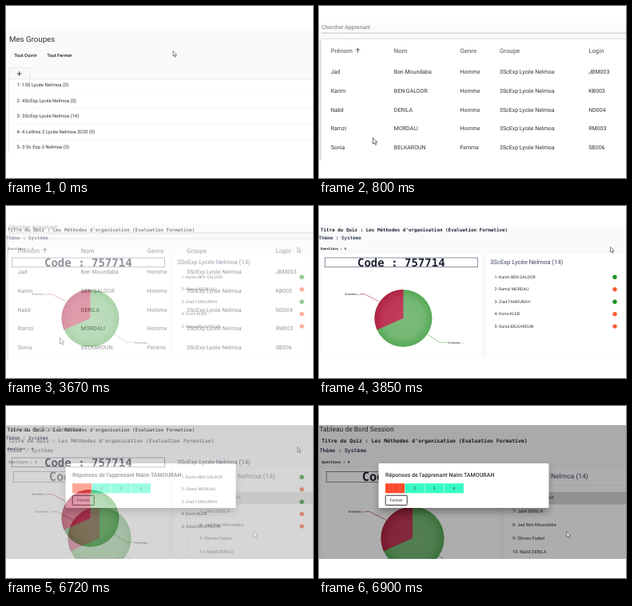
These frames come from a looping animation (384x216 px, 8 s). An HTML page:

```html
<!DOCTYPE html>
<html lang="fr">
<head>
<meta charset="utf-8">
<title>Quiz</title>
<style>
html, body { margin: 0; width: 100%; height: 100%; overflow: hidden; background: #fff; }
svg { display: block; width: 100vw; height: 100vh; font-family: Roboto, sans-serif; fill: #333; text-rendering: geometricPrecision; }
.mono { font-family: "DejaVu Sans Mono", monospace; font-weight: bold; fill: #1f2433; }
.med { font-weight: 500; }
.mid { text-anchor: middle; }
.head { font-size: 7.8px; font-weight: 500; fill: #757575; }
.page { fill: #fafafa; }
.white { fill: #fff; }
.line { fill: none; stroke-width: .6; }
.scene { opacity: 0; animation: 8s linear infinite; }
#learners { animation-name: in1; }
#quizPage { animation-name: in2; }
#board { animation-name: in3; }
/* six 60 ms steps, the first one immediate */
@keyframes in1 {
  0% { opacity: 0; }
  6.2375% { opacity: 0; animation-timing-function: steps(6, start); }
  10.7375%, 100% { opacity: 1; }
}
@keyframes in2 {
  0% { opacity: 0; }
  44.3625% { opacity: 0; animation-timing-function: steps(6, start); }
  48.8625%, 100% { opacity: 1; }
}
@keyframes in3 {
  0% { opacity: 0; }
  82.4875% { opacity: 0; animation-timing-function: steps(6, start); }
  86.9875%, 100% { opacity: 1; }
}
</style>
</head>
<body>
<svg viewBox="0 0 384 216" preserveAspectRatio="none">
  <defs>
    <radialGradient id="green" gradientUnits="userSpaceOnUse" cx="105.5" cy="141" r="36">
      <stop offset="0" stop-color="#7dbb7d"/><stop offset=".7" stop-color="#73b773"/><stop offset="1" stop-color="#56a856"/>
    </radialGradient>
    <radialGradient id="red" gradientUnits="userSpaceOnUse" cx="105.5" cy="141" r="36">
      <stop offset="0" stop-color="#c23f5c"/><stop offset=".7" stop-color="#bd3655"/><stop offset="1" stop-color="#b02244"/>
    </radialGradient>
    <filter id="soft" x="-20%" y="-20%" width="140%" height="160%"><feGaussianBlur stdDeviation="2"/></filter>
    <filter id="deep" x="-20%" y="-40%" width="140%" height="200%"><feGaussianBlur stdDeviation="5"/></filter>
    <clipPath id="listCut"><rect y="24" width="384" height="168"/></clipPath>
    <clipPath id="cardCut"><rect y="22" width="384" height="172"/></clipPath>
    <path id="cursor" d="M0 0V7.6L1.8 6.1 3 8.9 4.3 8.3 3.1 5.6H5.4Z" fill="#fff" stroke="#333" stroke-width=".7"/>
  </defs>

  <g id="groups">
    <rect class="white" width="384" height="216"/>
    <rect class="page" y="31" width="384" height="154"/>
    <text x="4" y="45.2" font-size="9.7">Mes Groupes</text>
    <g class="med" font-size="5.8" fill="#222">
      <text x="10.3" y="64.4">Tout Ouvrir</text>
      <text x="51.3" y="64.4">Tout Fermer</text>
    </g>
    <rect class="white" x="4" y="92" width="380" height="93"/>
    <path class="line" d="M4 185V78H30V91.7M4 91.7H384" stroke="#dcdcdc"/>
    <path class="line" d="M13.7 85H19.7M16.7 82V88" stroke="#333" style="stroke-width:.9"/>
    <path class="line" d="M4 109H384M4 128.5H384M4 148H384M4 167.5H384" stroke="#e2e2e2" stroke-dasharray="1 1"/>
    <g id="groupRows" font-size="6"></g>
    <use href="#cursor" x="209" y="56.5" transform="translate(31.35 8.5) scale(.85)"/>
  </g>

  <g id="learners" class="scene">
    <rect class="white" width="384" height="216"/>
    <rect class="page" y="22" width="384" height="172"/>
    <text x="3" y="29.4" font-size="6.9" fill="#777">Chercher Apprenant</text>
    <path class="line" d="M3 34H384" stroke="#999"/>
    <g clip-path="url(#cardCut)">
      <rect x="3" y="43" width="390" height="165" fill="#000" opacity=".3" filter="url(#soft)"/>
      <rect class="white" x="3" y="42" width="390" height="165" rx="1.5"/>
    </g>
    <g id="tableHead" class="head"></g>
    <path class="line" d="M48.5 58.6V53.4M46 55.8L48.5 53.2 51 55.8" stroke="#555" style="stroke-width:1"/>
    <g id="tableRows" font-size="7"></g>
    <use href="#cursor" x="67.5" y="165.5"/>
  </g>

  <g id="quizPage" class="scene">
    <rect class="white" width="384" height="216"/>
    <g id="quiz">
      <rect class="page" y="24.5" width="384" height="165.5"/>
      <rect class="white" x="2" y="60" width="202" height="130" stroke="#eee" stroke-width=".4"/>
      <rect class="white" x="209" y="60" width="173" height="130" stroke="#eee" stroke-width=".4"/>
      <g class="mono">
        <text x="2" y="31.6" font-size="5.9">Titre du Quiz : Les Méthodes d'organisation (Evaluation Formative)</text>
        <text x="-.3" y="42.3" font-size="5.9" fill="#39435c">Thème : Système</text>
        <text x="2" y="55" font-size="4.1">Questions : 4</text>
        <rect class="white" x="7.5" y="65" width="191" height="11.7" stroke="#59617a" stroke-width=".7"/>
        <text x="48" y="75.9" font-size="14">Code : 757714</text>
      </g>
      <text x="214" y="72.6" font-size="7.7" fill="#3d4760">3ScExp Lycée Nelmoa (14)</text>
      <circle cx="105.5" cy="141" r="36" fill="url(#green)"/>
      <path d="M105.5 141V105A36 36 0 0 0 72.6 155.6Z" fill="url(#red)"/>
      <path class="line" d="M51 110.6H57L75.4 120.2" stroke="#b02b4a"/>
      <path class="line" d="M135.4 161.1L151 171.2H160" stroke="#5aa65a"/>
      <g font-size="3.7" fill="#222">
        <text x="32.5" y="111.9">Erronées (...</text>
        <text x="161" y="172.6">Correctes ...</text>
      </g>
    </g>
    <g id="quizRows" font-size="5.15"></g>
    <use href="#cursor" x="364.5" y="51.5" transform="translate(54.7 7.7) scale(.85)"/>
  </g>

  <g id="board" class="scene">
    <rect class="white" width="384" height="216"/>
    <g clip-path="url(#listCut)">
      <rect class="page" y="24" width="384" height="168"/>
      <use href="#quiz" transform="translate(1 11) scale(1.1)"/>
      <rect class="page" y="24" width="384" height="12"/>
      <text x=".4" y="32" font-size="8.5">Tableau de Bord Session</text>
      <path class="line" d="M231 100H384" stroke="#ddd"/>
      <rect x="231" y="108" width="153" height="15.5" fill="#d6d6d6"/>
      <g id="boardRows" font-size="5.65"></g>
      <rect y="24" width="384" height="168" opacity=".32" fill="#000"/>
      <rect x="75" y="77" width="212" height="56" fill="#000" opacity=".32" filter="url(#deep)"/>
    </g>
    <rect class="white" x="74.5" y="72" width="213" height="56" rx="1.5"/>
    <text class="med" x="83" y="88.6" font-size="7.1">Réponses de l'apprenant Naïm TAMOURAH</text>
    <g id="cells" class="mid" font-size="5"></g>
    <rect class="white" x="83.2" y="112.3" width="27" height="12.2" rx="1" stroke="#222" stroke-width=".9"/>
    <text class="mid" x="96.7" y="120.2" font-size="5">Fermer</text>
    <use href="#cursor" x="310" y="158" transform="translate(46.5 23.7) scale(.85)"/>
  </g>
</svg>
<script>
const fill = (id, parts) => document.getElementById(id).insertAdjacentHTML('beforeend', parts.join(''));
const text = (x, y, s) => `<text x="${x}" y="${y}">${s}</text>`;
const column = (id, x, y, step, rows) => fill(id, rows.map((s, i) => text(x, y + i * step, s)));

column('groupRows', 13.6, 101.2, 19.5, [
  '1- 1S5 Lycée Nelmoa (0)', '2- 4ScExp Lycée Nelmoa (0)', '3- 3ScExp Lycée Nelmoa (14)',
  '4- 4 Lettres 2 Lycée Nelmoa 2020 (0)', '5- 3 Sc Exp 3 Nelmoa (0)'
]);

const cols = [14.7, 93.8, 176.4, 226, 337.2];
fill('tableHead', ['Prénom', 'Nom', 'Genre', 'Groupe', 'Login'].map((s, i) => text(cols[i], 58.8, s)));
const learners = [
  ['Jad', 'Ben Moundaba', 'Homme', 'JBM003'],
  ['Karim', 'BEN GALDOR', 'Homme', 'KB003'],
  ['Nabil', 'DERILA', 'Homme', 'ND004'],
  ['Ramzi', 'MORDALI', 'Homme', 'RM003'],
  ['Sonia', 'BELKAROUN', 'Femme', 'SB006']
];
learners.forEach(([first, last, sex, login], r) => fill('tableRows',
  [first, last, sex, '3ScExp Lycée Nelmoa', login].map((s, i) => text(cols[i], 84.9 + r * 23.85, s))));

column('quizRows', 219.5, 90.9, 15.45, [
  '1- Karim BEN GALDOR', '2- Ramzi MORDALI', '3- Ziad TAMOURAH', '4- Dorra KLEB', '5- Sonia BELKAROUN'
]);
fill('quizRows', [1, 0, 1, 0, 0].map((ok, i) =>
  `<circle cx="370" cy="${89.3 + i * 15.45}" r="2.7" fill="${ok ? '#1f931f' : '#ff5d36'}"/>`));

column('boardRows', 242, 117.3, 17, [
  '6- Naïm TAMOURAH', '7- Jalel DERILA', '8- Jad Ben Moundaba', '9- Slimen Fadori', '10- Nabil DERILA'
]);

fill('cells', [0, 1, 2, 3].map(i => {
  const x = 83 + i * 24.6;
  return `<rect x="${x}" y="97.2" width="24.1" height="12.2" fill="${i ? '#36fcc3' : '#ff4d2e'}"/>` + text(x + 12, 105.1, i + 1);
}));
</script>
</body>
</html>
```
